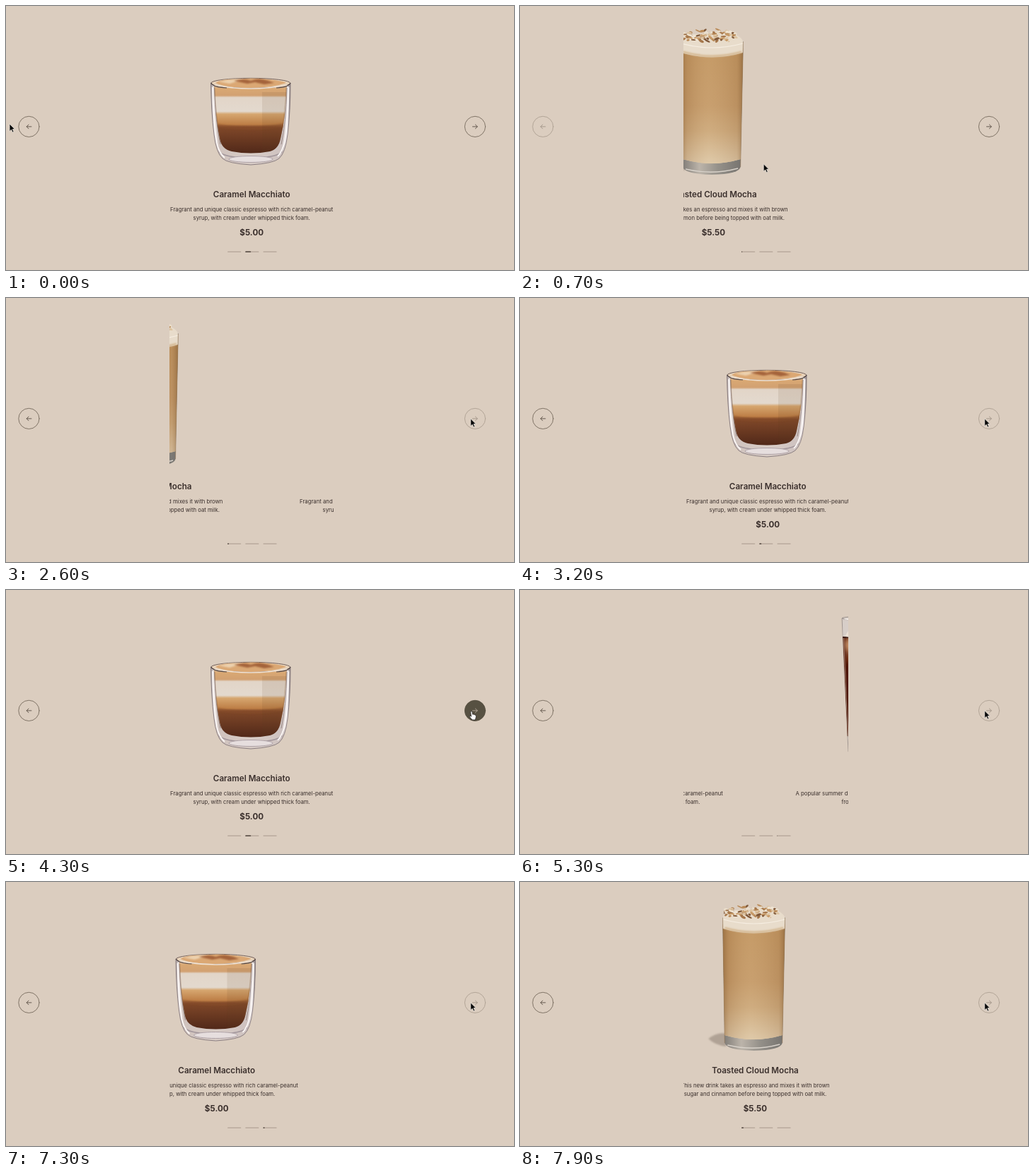
An HTML page for the animation above (8 s loop, 718x374 px).

```html
<!DOCTYPE html>
<html lang="en">
<head>
<meta charset="utf-8">
<title>Coffee carousel</title>
<style>
  html, body { margin: 0; width: 100%; height: 100%; overflow: hidden; background: #dbcdbf; }
  svg { display: block; width: 718px; height: 374px; }
  text { font-family: Inter, Roboto, sans-serif; text-anchor: middle; fill: #3a2f2c; }
  .title { font-size: 11.65px; font-weight: 600; }
  .price { font-size: 11.6px; font-weight: 700; }
  .body { font-size: 7.74px; }
  .button { fill: none; stroke: #574c42; stroke-width: .9; stroke-linecap: round; stroke-linejoin: round; }
  .button circle { stroke: #776a5d; }
  .button.disabled { opacity: .45; }
  .button.hover circle { fill: #575142; stroke: #575142; }
  .button.hover path { stroke: #b9ada0; }
  .track { fill: #b9aa9d; }
  .fill { fill: #51463e; }
</style>
</head>
<body>
<svg viewBox="0 0 718 374">
  <defs>
    <clipPath id="window"><rect x="231" width="233" height="374"/></clipPath>
    <filter id="soft" x="-50%" y="-50%" width="200%" height="200%"><feGaussianBlur stdDeviation="1.2"/></filter>
    <filter id="hazy" x="-20%" y="-20%" width="140%" height="140%"><feGaussianBlur stdDeviation=".45"/></filter>
    <filter id="blur" x="-60%" y="-60%" width="220%" height="220%"><feGaussianBlur stdDeviation="4"/></filter>

    <linearGradient id="layers" x2="0" y2="1">
      <stop offset="0" stop-color="#ead3b8"/><stop offset=".05" stop-color="#d9a873"/>
      <stop offset=".15" stop-color="#d2a172"/><stop offset=".18" stop-color="#e2d5c8"/>
      <stop offset=".38" stop-color="#e3d9ce"/><stop offset=".42" stop-color="#d6a66f"/>
      <stop offset=".57" stop-color="#bd7e46"/><stop offset=".61" stop-color="#804829"/>
      <stop offset="1" stop-color="#4f2718"/>
    </linearGradient>
    <linearGradient id="clear">
      <stop offset="0" stop-color="#a39796"/><stop offset=".04" stop-color="#efe8e6"/>
      <stop offset=".1" stop-color="#cfc2bd"/><stop offset=".5" stop-color="#d9cdc7"/>
      <stop offset=".9" stop-color="#cec2c0"/><stop offset=".96" stop-color="#f2ecec"/>
      <stop offset="1" stop-color="#7d7273"/>
    </linearGradient>
    <clipPath id="mugInside"><path d="M294 112Q345 122 397 112Q396 155 388 188Q385 203 373 206Q346 211 319 206Q305 203 302 188Q295 155 294 112Z"/></clipPath>

    <linearGradient id="latte" x2="0" y2="1">
      <stop offset="0" stop-color="#bf935f"/><stop offset=".5" stop-color="#c29868"/>
      <stop offset=".72" stop-color="#caa77b"/><stop offset="1" stop-color="#dcc8aa"/>
    </linearGradient>
    <linearGradient id="sides">
      <stop offset="0" stop-color="#7a5128" stop-opacity=".5"/><stop offset=".1" stop-color="#a07344" stop-opacity=".25"/>
      <stop offset=".45" stop-color="#f6d6a4" stop-opacity=".12"/><stop offset=".9" stop-color="#a07344" stop-opacity=".2"/>
      <stop offset="1" stop-color="#74502a" stop-opacity=".5"/>
    </linearGradient>
    <linearGradient id="base">
      <stop offset="0" stop-color="#7b7772"/><stop offset=".3" stop-color="#bcb4aa"/>
      <stop offset=".6" stop-color="#949089"/><stop offset="1" stop-color="#74716d"/>
    </linearGradient>

    <linearGradient id="cola">
      <stop offset="0" stop-color="#5a1c0c"/><stop offset=".2" stop-color="#3a0e07"/>
      <stop offset=".6" stop-color="#451408"/><stop offset="1" stop-color="#2a0a07"/>
    </linearGradient>
    <clipPath id="colaInside"><path id="colaShape" d="M302.5 66Q346 70 393 66L387 207Q347 212 309 207Z"/></clipPath>
  </defs>

  <g clip-path="url(#window)">
    <g id="strip">
      <g class="slide">
        <path d="M281 222Q294 212 306 215V233Q290 231 281 222Z" fill="#94867a" opacity=".6" filter="url(#soft)"/>
        <path d="M301 50L304 228Q306 238 345 239Q384 238 385.500 228L389.500 50Z" fill="url(#base)"/>
        <path d="M308 231Q345 240 382 230" fill="none" stroke="#d8d2ca" stroke-width="1.300"/>
        <path id="latteShape" d="M301.500 60L304 217Q345 229 385.500 217L389 60Z" fill="url(#latte)"/>
        <g fill="#7b5a38" opacity=".6" filter="url(#soft)">
          <path d="M335 87l12-4 4 7-11 5zM322 109l13-2 3 6-14 2zM343 121l12 4 10 7-5 2-15-7zM316 172l9 2-1 7-8-1zM305 82l5 2-2 10zM375 80l8-3-1 8z"/>
        </g>
        <rect x="330" y="72" width="17" height="152" fill="#f0d4a6" opacity=".12" filter="url(#soft)"/>
        <g id="bubbles" fill="#e6cfaa"></g>
        <use href="#latteShape" style="fill: url(#sides)"/>
        <path d="M301.500 60L304 217Q345 229 385.500 217L389 60Z" fill="url(#sides)"/>
        <path d="M301 51Q304 42 318 40L372 38Q388 43 389.500 52L389 66Q345 79 301.500 66Z" fill="#e8dccb"/>
        <path d="M302 53Q345 65 389 53" fill="none" stroke="#f6eee2" stroke-width="1.200"/>
        <path d="M304 65Q345 77 387 65" fill="none" stroke="#d3b58d" stroke-width="2.500" filter="url(#soft)"/>
        <g id="crumbs" filter="url(#hazy)"></g>
        <path d="M301.300 51L304 228M389.300 51L385.500 228" fill="none" stroke="#8d6a45" stroke-width=".7" opacity=".7"/>
        <text class="title" x="347.200" y="271">Toasted Cloud Mocha</text>
        <text class="body" x="347.200" y="290.800">This new drink takes an espresso and mixes it with brown</text>
        <text class="body" x="347.200" y="302.600">sugar and cinnamon before being topped with oat milk.</text>
        <text class="price" x="347.200" y="324.500">$5.50</text>
      </g>

      <g class="slide">
        <path d="M289.500 109Q290 150 294 182Q297 208 306 216Q313 223 346 225Q378 223 386 216Q395 208 398 182Q402 150 402 109Z" fill="url(#clear)" stroke="#83777a" stroke-width=".9"/>
        <path d="M301 206Q308 215 346 215Q384 215 390 206" fill="none" stroke="#a3979c" stroke-width="1.500"/>
        <ellipse cx="346" cy="217" rx="31" ry="4.500" fill="#e6dede" stroke="#a99ca2" stroke-width=".9"/>
        <g clip-path="url(#mugInside)">
          <rect x="290" y="112" width="112" height="98" fill="url(#layers)"/>
          <path d="M299 167Q346 175 395 166V171Q346 179 299 172Z" fill="#874d2b" opacity=".6" filter="url(#soft)"/>
          <path d="M362 122H398V210H362Z" fill="#5b3a22" opacity=".1"/>
          <path d="M294 112Q295 155 302 190M397 112Q396 155 388 190" fill="none" stroke="#7f5637" stroke-width="3" opacity=".3"/>
        </g>
        <path d="M292 115Q292.500 160 298 194Q301 208 309 215M399.500 115Q399 160 394 190Q391 206 384 213" fill="none" stroke="#fbf7f6" stroke-width="1.700"/>
        <path d="M294.500 116Q296 165 303 196M397 116Q396 165 389 196" fill="none" stroke="#8d7d79" stroke-width=".8"/>
        <ellipse cx="345.700" cy="109.300" rx="56" ry="7" fill="#e8d3ba" stroke="#73605a" stroke-width="1"/>
        <path d="M296 109Q305 103 327 104Q348 101 370 104Q391 106 396 109Q376 116 345 116Q312 116 296 109Z" fill="#dba874"/>
        <path d="M300 107Q318 103 336 104L316 110Z" fill="#ecd2b0" filter="url(#soft)"/>
        <g fill="#a4633a" filter="url(#soft)">
          <path d="M322 106Q336 102 346 106Q357 101 371 106L379 109L365 111L352 108L341 110Z"/>
        </g>
        <path d="M294 112Q345 122 398 112" fill="none" stroke="#f0e2d4" stroke-width="1.600"/>
        <path d="M290 109Q292 115 312 116M402 109Q400 115 382 116" fill="none" stroke="#554947" stroke-width="1.200"/>
        <text class="title" x="347.200" y="271">Caramel Macchiato</text>
        <text class="body" x="347.200" y="290.800">Fragrant and unique classic espresso with rich caramel-peanut</text>
        <text class="body" x="347.200" y="302.600">syrup, with cream under whipped thick foam.</text>
        <text class="price" x="347.200" y="324.500">$5.00</text>
      </g>

      <g class="slide">
        <path d="M301.500 40L310.500 229Q312 234 347 235Q384 234 386 229L394.500 40Z" fill="#d5cbc5" stroke="#938985" stroke-width=".8"/>
        <path d="M303 44L394 44L393 68L303 68Z" fill="#d7cec8"/>
        <path d="M306 65L317 48L334 43L350 49L361 67L330 70Z" fill="#ece1d5"/>
        <path d="M317 48L329 56L350 49M329 56L324 68" fill="none" stroke="#b29078" stroke-width="1.200"/>
        <path d="M333 56L350 51L359 66L336 66Z" fill="#bc8e6d" opacity=".55"/>
        <g clip-path="url(#colaInside)">
          <use href="#colaShape" fill="url(#cola)"/>
          <g filter="url(#blur)">
            <ellipse cx="318" cy="78" rx="13" ry="12" fill="#d8a273"/>
            <ellipse cx="319" cy="96" rx="12" ry="7" fill="#8d441c"/>
            <ellipse cx="358" cy="111" rx="19" ry="18" fill="#9a4918"/>
            <ellipse cx="346" cy="117" rx="8" ry="6" fill="#c67a37"/>
            <ellipse cx="371" cy="88" rx="9" ry="13" fill="#712c12"/>
            <ellipse cx="371" cy="165" rx="13" ry="17" fill="#823514"/>
            <ellipse cx="342" cy="148" rx="15" ry="8" fill="#5c210f"/>
          </g>
          <path d="M312 161L329 157L333 208H309Z" fill="#815b4d" opacity=".65"/>
          <path d="M371 66H383L378 208H368Z" fill="#1d0908" opacity=".45"/>
          <path d="M304 68L310 207" stroke="#92705f" stroke-width="1.200"/>
          <path d="M302 67H394" stroke="#260d09" stroke-width="1.600"/>
        </g>
        <path d="M310 209Q347 214 386 209L384 229Q347 236 312 229Z" fill="#cfc7c1"/>
        <path d="M312 213Q347 219 385 212M313 228Q347 236 384 228" fill="none" stroke="#807873" stroke-width="1.500"/>
        <path d="M317 216L318 228M331 218L333 230M371 218L366 230M380 215L378 228" stroke="#f7f3ef" stroke-width="3" opacity=".85"/>
        <path d="M344 219L344 231" stroke="#8b827d" stroke-width="5" opacity=".4"/>
        <ellipse cx="348" cy="40" rx="46.300" ry="3" fill="#ded4cd" stroke="#8f8682" stroke-width=".9"/>
        <path d="M305 41Q348 46 391 41" fill="none" stroke="#faf7f4" stroke-width="1.100"/>
        <text class="title" x="347.200" y="271">Ice coffee</text>
        <text class="body" x="347.200" y="290.800">A popular summer drink that tones and invigorates. Prepared</text>
        <text class="body" x="347.200" y="302.600">from coffee, milk and ice.</text>
        <text class="price" x="347.200" y="324.500">$4.50</text>
      </g>
    </g>
  </g>

  <g id="prev" class="button" transform="translate(32.400 170.900)"><circle r="14.600"/><path d="M3.500 0H-3.200M-.4 -2.900L-3.300 0L-.4 2.900"/></g>
  <g id="next" class="button" transform="translate(663 170.900)"><circle r="14.600"/><path d="M-3.500 0H3.200M.4 -2.900L3.300 0L.4 2.900"/></g>
  <g id="dots"></g>

  <g id="cursor">
    <path id="arrow" d="M0 0V10.500L2.500 8.300L4.200 12L6 11.200L4.300 7.600H7.500Z" fill="#080808" stroke="#f5efe9" stroke-width=".7"/>
    <path id="hand" d="M0 2.200Q0 .5 1.200 .6Q2.200 .7 2.400 2L2.800 5.200Q4 4.500 4.700 5.600Q6 5.200 6.400 6.300Q7.500 6 7.700 7.300L7.500 10L6.500 13H2.200L-.7 9.400Q-2.400 7.700-1.400 7.200Q-.6 6.900 .8 8.300Z" fill="#fff" stroke="#252220" stroke-width=".8"/>
  </g>
</svg>
<script>
const LOOP = 8000, STEP = 100, SPACING = 329;
const byId = id => document.getElementById(id);
const draw = (parent, tag, attrs) => {
  const node = document.createElementNS('http://www.w3.org/2000/svg', tag);
  for (const key in attrs) node.setAttribute(key, attrs[key]);
  return parent.appendChild(node);
};

let seed = 11;
const random = (min, max) => {
  seed = (seed * 16807) % 2147483647;
  return min + (max - min) * seed / 2147483647;
};

// Crumb topping and fine bubbles
const crumbColors = ['#a5764a', '#e9dcc8', '#c79a68', '#efe4d3', '#b98a58', '#dcc3a0', '#80593a'];
for (let i = 0; i < 90; i++) {
  const x = random(305, 382), edge = Math.abs(x - 343) / 40;
  const y = random(33 + 6 * edge * edge, 51 - 3 * edge);
  draw(byId('crumbs'), 'ellipse', {
    rx: random(2, 4.5), ry: random(.8, 1.8),
    fill: crumbColors[i % crumbColors.length],
    transform: `translate(${x} ${y}) rotate(${random(-45, 45)})`
  });
}
for (let i = 0; i < 130; i++) {
  draw(byId('bubbles'), 'circle', {
    cx: random(305, 384), cy: random(76, 205), r: random(.2, .6), opacity: random(.2, .6)
  });
}

const slides = [...document.querySelectorAll('.slide')];
slides.forEach((slide, i) => slide.setAttribute('transform', `translate(${i * SPACING} 0)`));

const fills = slides.map((_, i) => {
  const bar = { x: 313 + i * 25.2, y: 347.5, height: 1.5, rx: .75 };
  draw(byId('dots'), 'rect', { ...bar, width: 19.3, class: 'track' });
  return draw(byId('dots'), 'rect', { ...bar, width: 0, class: 'fill' });
});

const moves = [
  { at: 150, time: 1100, from: 1, to: 0, button: 'prev' },
  { at: 2239, time: 1100, from: 0, to: 1, button: 'next' },
  { at: 4900, time: 1100, from: 1, to: 2, button: 'next' },
  { at: 6905, time: 1230, from: 2, to: 0, button: 'next' }
];
const HALFWAY = .35; // time share at which the easing reaches one half

// cubic-bezier(.4, 0, .2, 1)
function ease(x) {
  if (x >= 1) return 1;
  let low = 0, high = 1;
  for (let i = 0; i < 24; i++) {
    const u = (low + high) / 2, v = 1 - u;
    if (1.2 * v * v * u + .6 * v * u * u + u ** 3 < x) low = u; else high = u;
  }
  return low * low * (3 - 2 * low);
}

const path = [
  [0, 5, 167], [100, 22, 168], [200, 24, 168], [400, 18, 225], [600, 193, 225],
  [800, 495.5, 222.5], [1300, 495.5, 222.5], [1800, 648, 176], [1900, 656.7, 171], [LOOP, 656.7, 171]
];
function cursorAt(t) {
  const i = path.findIndex(point => point[0] > t);
  const [t0, x0, y0] = path[i - 1], [t1, x1, y1] = path[i];
  const k = (t - t0) / (t1 - t0);
  return [x0 + (x1 - x0) * k, y0 + (y1 - y0) * k];
}

const buttons = { prev: 32.4, next: 663 };

function render(t) {
  const move = moves.filter(m => m.at <= t).pop();
  let position = 1, active = 1, since = -1670, busy = null;
  if (move) {
    const x = (t - move.at) / move.time, switched = x >= HALFWAY;
    position = move.from + (move.to - move.from) * ease(x);
    active = switched ? move.to : move.from;
    since = move.at + (switched ? HALFWAY * move.time : 0);
    busy = x < 1 ? move.button : null;
  }
  byId('strip').setAttribute('transform', `translate(${-position * SPACING} 0)`);
  fills.forEach((fill, i) =>
    fill.setAttribute('width', i === active ? Math.min(19.3, .5 + (t - since) * .0045) : 0));

  const [x, y] = cursorAt(t);
  let pointing = false;
  for (const id in buttons) {
    const disabled = id === busy;
    const hover = !disabled && Math.hypot(x - buttons[id], y - 170.9) < 14.6;
    byId(id).classList.toggle('disabled', disabled);
    byId(id).classList.toggle('hover', hover);
    pointing = pointing || hover;
  }
  byId('cursor').setAttribute('transform', `translate(${x} ${y})`);
  byId('arrow').style.display = pointing ? 'none' : '';
  byId('hand').style.display = pointing ? '' : 'none';
}

// Motion advances ten times a second
const start = performance.now();
function tick() {
  const elapsed = performance.now() - start + 8;
  render(Math.floor(elapsed / STEP) * STEP % LOOP);
  requestAnimationFrame(tick);
}
tick();
</script>
</body>
</html>
```
